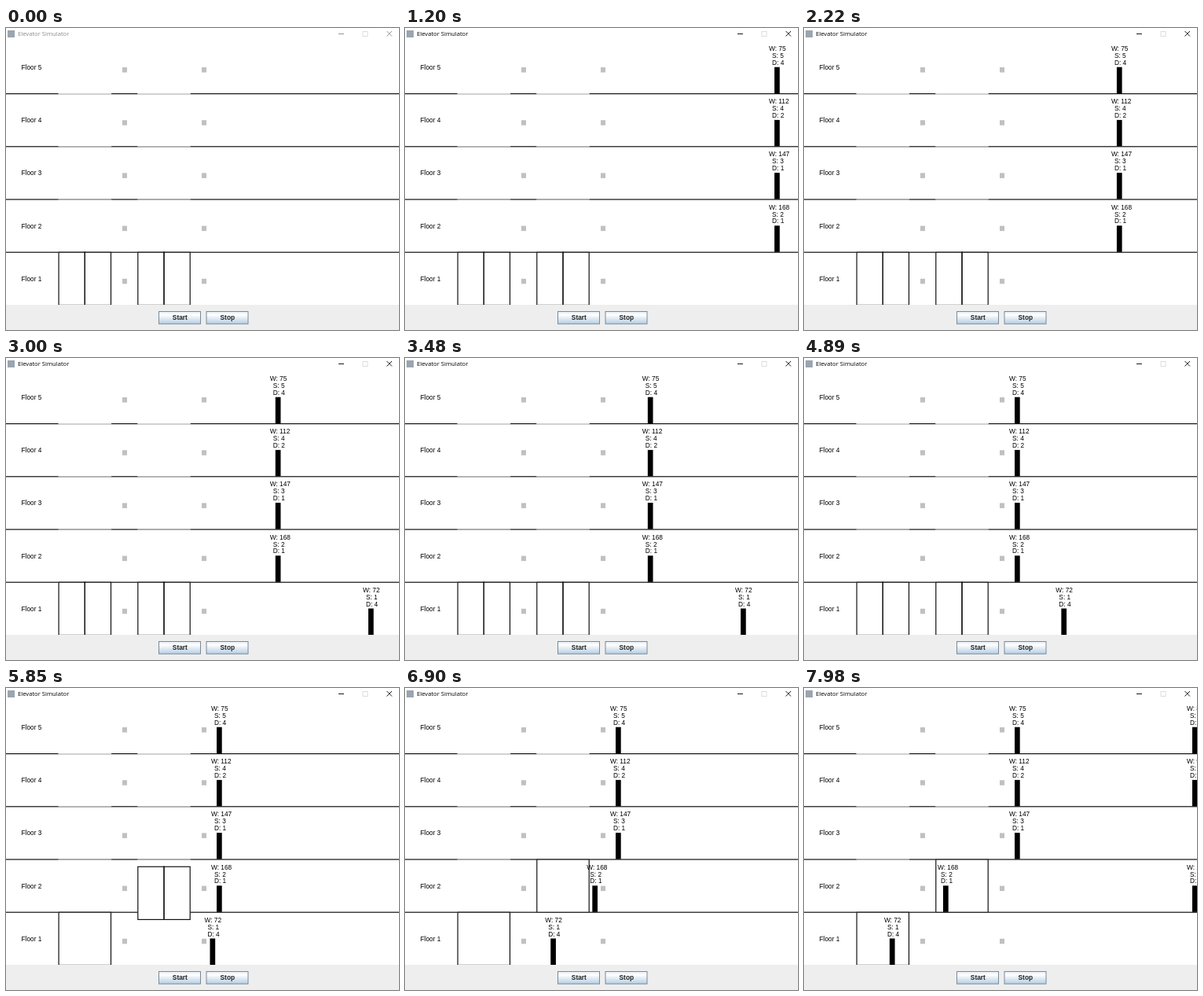
These frames come from a looping animation (500x384 px, 8000 ms). An HTML page with a canvas:

```html
<!DOCTYPE html>
<html lang="en">
<head>
<meta charset="utf-8">
<title>Elevator Simulator</title>
<style>
html, body { margin: 0; width: 100%; height: 100%; overflow: hidden; background: #fff; }
canvas { display: block; }
</style>
</head>
<body>
<canvas id="stage" width="500" height="384"></canvas>
<script>
const ctx = document.getElementById('stage').getContext('2d');
const LOOP = 8000, TICK = 30;
const SPEED = 0.0707;            // px per ms, for people, cars and doors
const PITCH = 67.2, LINE = 1.2, CAR = 67.6, HALF = CAR / 2;
const SHAFTS = [66.5, 167.2];
const QUEUE_X = 268;
const DEPART = 5030, ARRIVE = DEPART + PITCH / SPEED;
const BOARD = 6480;
const SANS = '"Liberation Sans", Arial, sans-serif';

// enter: time when the figure's bar reaches the right edge
const people = [
  { floor: 5, enter: 776, info: [75, 5, 4] },
  { floor: 4, enter: 776, info: [112, 4, 2] },
  { floor: 3, enter: 776, info: [147, 3, 1] },
  { floor: 2, enter: 776, info: [168, 2, 1], board: BOARD },
  { floor: 1, enter: 2448, info: [72, 1, 4], board: 0 },
  { floor: 5, enter: 7895, info: [80, 5, 1] },
  { floor: 4, enter: 7895, info: [95, 4, 1] },
  { floor: 2, enter: 7895, info: [120, 2, 1] }
];

const clamp = (v, lo, hi) => Math.min(hi, Math.max(lo, v));
const floorY = floor => 83 + (5 - floor) * PITCH;
const travel = (t, start, max) => clamp((t - start) * SPEED, 0, max);

function box(x, y, w, h, color) {
  ctx.fillStyle = color;
  ctx.fillRect(x, y, w, h);
}

function text(str, x, y, font, color = '#000', align = 'left') {
  ctx.font = font;
  ctx.fillStyle = color;
  ctx.textAlign = align;
  ctx.fillText(str, x, y);
}

function stroke(color, ...lines) {
  ctx.strokeStyle = color;
  ctx.lineWidth = 0.9;
  ctx.beginPath();
  for (const [x1, y1, x2, y2] of lines) {
    ctx.moveTo(x1, y1);
    ctx.lineTo(x2, y2);
  }
  ctx.stroke();
}

function titleBar(active) {
  const ink = active ? '#000' : '#8a8a8a';
  box(2, 3, 9, 9, '#9aa5b0');
  text('Elevator Simulator', 15, 10.3, '7.65px "Open Sans", sans-serif', ink);
  stroke(ink, [423, 7.5, 430, 7.5], [484.5, 4, 491, 10.5], [491, 4, 484.5, 10.5]);
  ctx.strokeStyle = '#dadada';
  ctx.strokeRect(454, 4.5, 6, 6);
}

function building() {
  for (let floor = 5; floor >= 1; floor--) {
    const y = floorY(floor);
    if (floor > 1) {
      box(0, y, 500, LINE, '#111');
      for (const x of SHAFTS) box(x, y, CAR, LINE, '#d2d2d2');
    }
    text('Floor ' + floor, 19.5, y - 30, '8.3px ' + SANS);
    box(148, y - 33, 6, 6.5, '#c0c0c0');
    box(249, y - 33, 6, 6.5, '#c0c0c0');
  }
}

function car(x, y, gap) {
  box(x, y, CAR, PITCH + LINE, '#111');
  box(x + LINE, y + LINE, CAR - 2 * LINE, PITCH - LINE, '#fff');
  if (gap < HALF - 1) {
    const mid = x + HALF - LINE / 2;
    box(mid - gap, y, LINE, PITCH, '#111');
    box(mid + gap, y, LINE, PITCH, '#111');
  }
}

function personX(p, t) {
  const x = 500 - (t - p.enter) * SPEED;
  if (p.board === undefined) return Math.max(QUEUE_X, x);
  if (p.board === 0) return Math.max(SHAFTS[0] + 10.5, x);
  return Math.max(QUEUE_X, x) - travel(t, p.board, QUEUE_X - 177);
}

function person(p, t) {
  const x = personX(p, t), y = floorY(p.floor), [w, s, d] = p.info;
  if (x > 510) return;
  const font = '8.3px ' + SANS;
  text('W: ' + w, x - 7, y - 54, font);
  text('S: ' + s, x - 3, y - 45, font);
  text('D: ' + d, x - 3, y - 36.2, font);
  box(x, y - 33.3, 6.7, 33.5, '#000');
}

function button(label, x, pressed) {
  const fill = ctx.createLinearGradient(0, 360, 0, 376);
  fill.addColorStop(0, '#dfe9f3');
  fill.addColorStop(0.3, '#fff');
  fill.addColorStop(0.5, '#e8f0f7');
  fill.addColorStop(1, '#b8cfe5');
  box(x, 360, 54, 16.7, '#7a8a99');
  box(x + 1, 361, 52, 14.7, pressed ? '#b8cfe5' : fill);
  text(label, x + 27.3, 371.2, 'bold 8.3px ' + SANS, '#222', 'center');
}

function draw(now) {
  const t = Math.floor((now % LOOP) / TICK) * TICK;
  box(0, 0, 500, 384, '#fff');
  titleBar(t >= 540);
  building();
  car(SHAFTS[0], floorY(2), travel(t, DEPART, HALF));
  car(SHAFTS[1], floorY(2) - travel(t, DEPART, PITCH), travel(t, ARRIVE, HALF));
  for (const p of people) person(p, t);
  box(0, 352, 500, 32, '#eee');
  button('Start', 194, t >= 540 && t < 630);
  button('Stop', 254.5, false);
}

function frame() {
  draw(performance.now());
  requestAnimationFrame(frame);
}
frame();
</script>
</body>
</html>
```
